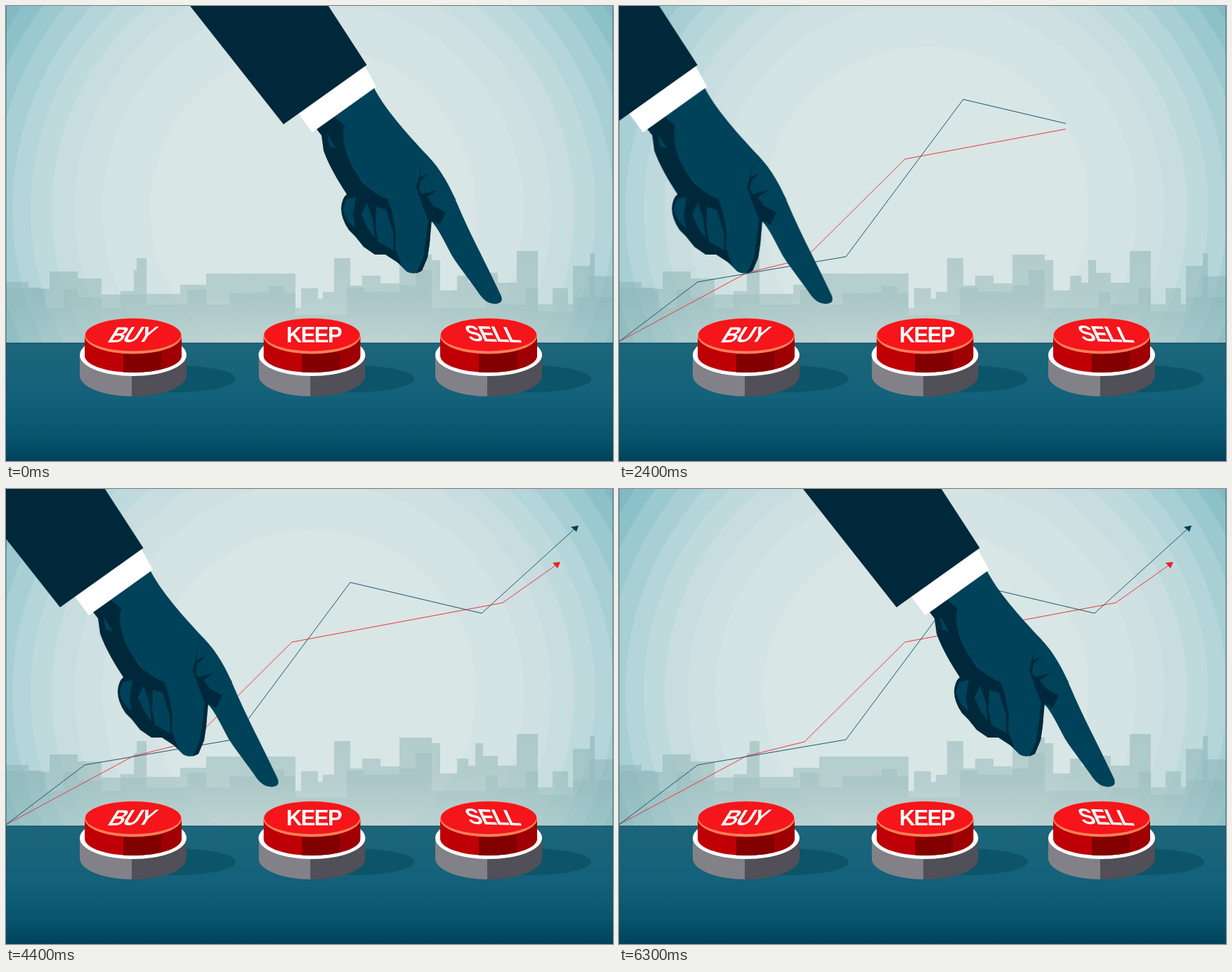
Recreate the animation shown at these times as an HTML page. Size 864 by 648 pixels, loop 6400 ms.

```html
<!DOCTYPE html>
<html lang="en">
<head>
<meta charset="utf-8">
<title>Buy, keep or sell</title>
<style>
  html, body { margin: 0; width: 100%; height: 100%; overflow: hidden; background: #0c5a72; }
  svg { display: block; width: 864px; height: 648px; }
  .label {
    font: bold 31px "Liberation Sans", Arial, sans-serif;
    letter-spacing: -1.6px;
    text-anchor: middle;
    fill: #fff;
  }
  .line { fill: none; stroke-width: 1; }
  .skin { fill: #004259; }
  .dark { fill: #00283b; }
  .hand { animation: point 6.4s infinite; }
  .wipe { animation: reveal 6.4s infinite; }

  /* 31 steps left, one beat of rest, 31 steps back */
  @keyframes point {
    0% { transform: translateX(0); animation-timing-function: steps(31, end); }
    48.4375% { transform: translateX(-519px); animation-timing-function: linear; }
    50% { transform: translateX(-519px); animation-timing-function: steps(31, end); }
    98.4375%, 100% { transform: translateX(0); }
  }
  @keyframes reveal {
    0% { transform: translateX(0); animation-timing-function: steps(31, end); }
    48.4375%, 100% { transform: translateX(821.5px); }
  }
</style>
</head>
<body>
<svg viewBox="0 0 864 648">
  <defs>
    <linearGradient id="floor" x2="0" y2="1">
      <stop offset="0" stop-color="#1c667a"/>
      <stop offset=".45" stop-color="#13617a"/>
      <stop offset=".8" stop-color="#07546d"/>
      <stop offset="1" stop-color="#00415a"/>
    </linearGradient>
    <linearGradient id="city" gradientUnits="userSpaceOnUse" x1="0" y1="350" x2="0" y2="480">
      <stop offset="0" stop-color="#7fa9a9" stop-opacity=".42"/>
      <stop offset=".5" stop-color="#7fa9a9" stop-opacity=".38"/>
      <stop offset="1" stop-color="#7fa9a9" stop-opacity=".2"/>
    </linearGradient>
    <clipPath id="shown"><rect class="wipe" x="-821.5" width="821.5" height="648"/></clipPath>
    <clipPath id="base"><path d="M 105 497 V 526 A 76 30 0 0 0 257 526 V 497 Z"/></clipPath>
    <clipPath id="cap"><path d="M 112 470 V 498 A 69 24 0 0 0 250 498 V 470 Z"/></clipPath>

    <g id="button">
      <ellipse cx="240" cy="531" rx="87" ry="19" fill="#0c5469"/>
      <g clip-path="url(#base)">
        <rect x="105" y="490" width="74" height="70" fill="#838188"/>
        <rect x="179" y="490" width="80" height="70" fill="#514f57"/>
      </g>
      <ellipse cx="181" cy="497" rx="76" ry="30" fill="#fff"/>
      <g clip-path="url(#cap)">
        <rect x="110" y="465" width="142" height="60" fill="#be0006"/>
        <rect x="167" y="465" width="54" height="60" fill="#820000"/>
        <rect x="221" y="465" width="30" height="60" fill="#9f0003"/>
      </g>
      <ellipse cx="181" cy="470" rx="69" ry="25.5" fill="#fb7f56"/>
      <ellipse cx="181" cy="468.3" rx="68" ry="23.2" fill="#f5151b"/>
    </g>
  </defs>

  <rect width="864" height="648" fill="#82bac4"/>
  <g id="sky"></g>
  <g id="skyline" fill="url(#city)"></g>

  <!-- floor -->
  <rect y="480" width="864" height="168" fill="url(#floor)"/>
  <rect y="479.5" width="864" height="1.5" fill="#124f64"/>
  <rect x=".5" y="-1" width="863" height="648.5" fill="none" stroke="#0b4a60" stroke-opacity=".4"/>

  <!-- chart -->
  <g clip-path="url(#shown)">
    <polyline class="line" stroke="#f0343a" points="0,478 181,380.5 264,360 407,218 707,162 782,109"/>
    <polygon fill="#f01d24" points="789,104 778,105 785,113"/>
    <polyline class="line" stroke="#1d5669" points="0,478 112,393 323,357 490,133 677,177 808,58"/>
    <polygon fill="#00425a" points="815,52 804,54 812,61"/>
  </g>

  <!-- buttons -->
  <use href="#button"/>
  <use href="#button" x="254.5"/>
  <use href="#button" x="506"/>
  <text class="label" transform="translate(179 478.5) rotate(-1) skewX(-33)" x="-6">BUY</text>
  <text class="label" x="438" y="479">KEEP</text>
  <text class="label" transform="translate(697 478) rotate(2) skewX(27)">SELL</text>

  <!-- arm -->
  <g class="hand">
    <g class="skin">
      <path d="M 440 172 L 522 113 C 538 146, 571 182, 600 213 L 640 275 L 606 307 L 556 364 L 543 290 L 449 184 Z"/>
      <path d="M 600 213 C 620 234, 632 257, 642 281 C 659 322, 684 368, 703 409 Q 709 420, 702 423
               Q 687 428, 675 412 C 663 394, 648 376, 635 356 C 624 336, 616 317, 605 306 L 585 260 Z"/>
      <path d="M 605 300 L 603 338 L 600 358 L 592 377 Q 580 384, 570 378 L 556 364 L 543 270 L 590 240 Z"/>
    </g>
    <g class="dark">
      <path d="M 441 174 L 466 157 L 482 170 C 477 185, 482 209, 494 231 C 506 252, 522 267, 543 275
               L 500 285 L 485 268 C 472 248, 460 228, 452 206 L 449 184 Z"/>
      <path d="M 485 268 L 500 262 L 543 275 L 549 291 L 555 322 L 554 345 L 563 369 L 540 354
               L 525 354 L 509 343 L 497 328 L 488 319 Q 477 303, 477 288 Q 478 274, 485 268 Z"/>
      <polygon points="592,226 589,244 602,238 590,249 588,261 592,268 615,262 599,272 609,285 626,294 617,312 606,305 584,258"/>
      <polygon points="584,258 606,305 603,338 600,358 592,377 584,381 594,358 598,330 601,304 594,287"/>
    </g>
    <g class="skin">
      <polygon points="457,181 470,203 460,200"/>
      <path d="M 484 275 L 498 272 L 494 297 L 497 316 Q 481 304, 480 288 Z"/>
      <polygon points="514,280 506,297 514,315 525,331 522,304"/>
      <polygon points="527,286 541,290 551,322 552,348 530,336 526,315"/>
    </g>
    <polygon fill="#fff" points="416,153 511,86 527,115 436,180"/>
    <polygon class="dark" points="262,0 459,0 513.5,84 395,168.5"/>
  </g>
</svg>
<script>
  function add(parent, tag, attrs) {
    const node = document.createElementNS("http://www.w3.org/2000/svg", tag);
    for (const key in attrs) node.setAttribute(key, attrs[key]);
    document.getElementById(parent).append(node);
  }

  // Sky bands, from the rim to the centre: radius and colour
  const bands = [
    [505, "#8dc1c9"], [482, "#9ac9cf"], [456, "#a8d0d4"],
    [428, "#b4d5d9"], [402, "#bfdadd"], [372, "#c7dddf"],
    [340, "#cee0e2"], [300, "#d4e3e3"], [232, "#d8e6e5"],
  ];
  for (const [r, fill] of bands) add("sky", "circle", { cx: 437, cy: 290, r, fill });

  // Roof line: each pair is the left edge and height above the horizon
  function roofs(steps, opacity) {
    const line = steps.map(([x, h]) => `H ${x} V ${480 - h}`).join(" ");
    add("skyline", "path", { d: `M 0 480 ${line} H 864 V 480 Z`, opacity });
  }

  const west = [
    [0, 87], [32, 79], [50, 77], [62, 102], [102, 92], [136, 69], [163, 74],
    [182, 104], [186, 121], [200, 70], [248, 83], [285, 99], [412, 50],
  ];
  const middle = [
    [420, 78], [444, 63], [451, 73], [467, 121], [490, 82], [507, 96],
    [533, 85], [560, 126], [606, 118], [618, 75], [642, 96], [658, 86],
  ];
  const east = [
    [668, 118], [679, 100], [700, 86], [727, 131], [757, 55],
    [778, 78], [800, 55], [807, 110], [831, 128], [838, 95],
  ];
  const near = [
    [0, 78], [56, 50], [82, 77], [102, 65], [136, 50], [163, 69], [200, 55],
    [258, 76], [285, 55], [318, 71], [358, 72], [374, 81], [396, 71], [412, 40],
    [485, 79], [510, 73], [560, 82], [583, 104], [606, 50], [683, 72],
    [700, 55], [740, 78], [757, 45], [807, 65], [831, 95], [838, 65],
  ];
  roofs([...west, ...middle, ...east], 1);
  roofs(near, 0.55);
</script>
</body>
</html>
```
